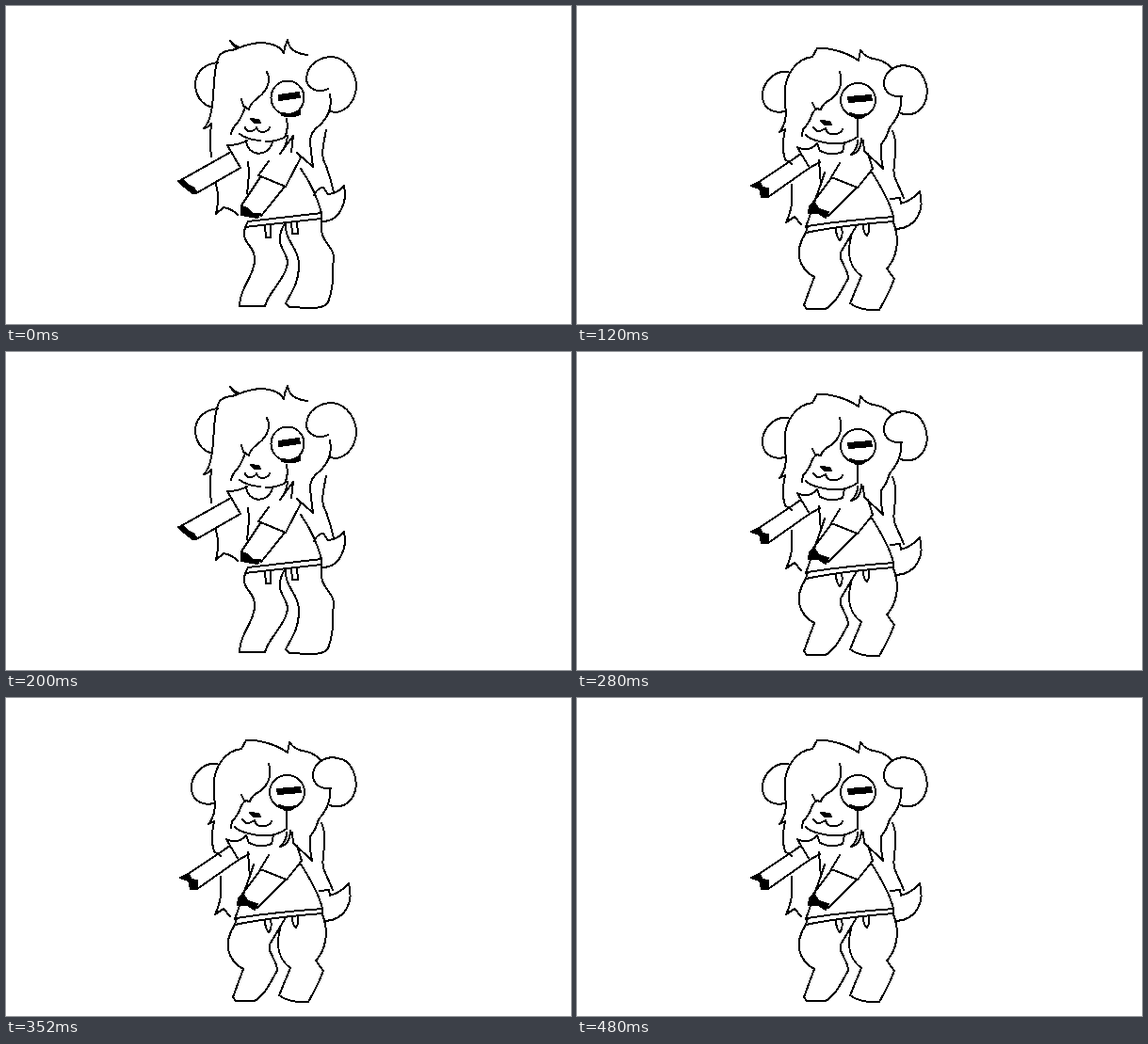
Animation of 600 by 338 pixels, one loop 0.56 s. Source, as an HTML page:

```html
<!DOCTYPE html>
<html lang="en">
<head>
<meta charset="utf-8">
<title>Dancing sheep</title>
<style>
  html, body { margin: 0; width: 100%; height: 100%; overflow: hidden; background: #fff; }
  svg { display: block; width: 100%; height: 100%; shape-rendering: crispEdges; }
  g { fill: none; stroke: #000; stroke-width: 2; stroke-linecap: round; stroke-linejoin: round; }
  .ink { fill: #000; }
  #down { visibility: hidden; }
</style>
</head>
<body>
<svg viewBox="0 0 600 338">
  <g id="up">
    <!-- hair -->
    <path d="M240 47L246 45Q242 43 238 37Q243 43 249 44Q267 36 283 41Q291 43 295 50Q296 42 299 36Q301 50 320 52"/>
    <path d="M241 47Q228 47 225 56C219 75 222 92 218 112Q216 124 210 130Q215 129 218 125Q216 145 218 160"/>
    <path d="M277 70C283 82 275 92 266 99Q259 104 258 110L252 106L250 99M254 108Q250 118 246 124Q240 130 239 136"/>
    <path d="M344 94C347 110 341 118 334 126Q322 134 323 146L326 171L309 156"/>
    <path d="M299 138Q298 149 291 157L305 138L303 155M340 132C336 152 334 160 340 170Q345 184 348 198"/>
    <path d="M223 189Q227 204 223 221L231 214Q239 215 246 222"/>
    <!-- ears -->
    <path d="M225 60C207 62 201 74 201 84C202 97 209 105 217 107"/>
    <path d="M342 88C331 94 319 87 319 77C320 61 334 54 347 54C363 56 372 72 372 86C371 104 357 116 345 112"/>
    <!-- face -->
    <ellipse cx="299" cy="97.500" rx="17.500" ry="18"/>
    <path class="ink" d="M290 95L311 92L312 97L290 100Z"/>
    <path class="ink" d="M292 114L302 115L312 111V115Q303 119 293 116Z"/>
    <path class="ink" d="M260 120L268 121L270 124L264 124Z"/>
    <path d="M254 129Q255 134 260 133Q265 132 266 129Q267 134 273 134Q279 133 280 129"/>
    <path d="M298 120L299 128L297 138M248 136Q256 142 270 143M276 144Q290 144 298 138M255 143C257 161 278 161 283 145"/>
    <!-- arms and shirt -->
    <path d="M256 143Q247 148 235 148L249 172L202 199M239 155L184 186"/>
    <path class="ink" d="M183 186L188 185L193 190L199 193L203 198L198 199L193 195L187 190Z"/>
    <path d="M257 166Q259 180 256 199M279 165L268 180L297 192L313 161L309 156M270 182L250 212M296 192L271 223"/>
    <path class="ink" d="M250 213L256 215L262 221L270 221L267 225L250 222Z"/>
    <path d="M313 173Q328 194 335 220L257 229L254 235L335 226V220"/>
    <path d="M327 201Q331 193 337 193L342 200Q353 199 359 191C363 209 354 229 336 229"/>
    <path d="M275 233L276 246H281V232M303 230L304 242H310L309 229"/>
    <!-- legs -->
    <path d="M254 235C249 255 265 252 264 272C262 289 248 301 248 319H275C278 305 298 289 299 272C298 260 283 253 296 231"/>
    <path d="M297 232C296 250 311 257 311 275C311 295 303 304 297 316L301 320L323 321Q339 321 342 315C349 297 346 286 348 267C347 252 332 253 335 226"/>
  </g>
  <g id="down">
    <!-- hair -->
    <path d="M250 54L255 45C270 44 288 50 299 58L301 47Q307 56 320 57Q329 60 334 66"/>
    <path d="M250 54C233 56 221 73 221 91C220 109 226 120 215 134L221 131Q217 151 221 163L228 168"/>
    <path d="M279 70C283 84 278 92 270 99Q260 104 259 110L253 109L250 103M256 109C246 113 252 120 240 131L239 138"/>
    <path d="M344 97C345 113 338 122 332 129Q329 140 323 147Q322 158 325 173L305 154L304 143"/>
    <path d="M302 141Q302 155 291 158Q298 152 298 143M335 133C343 150 334 168 337 181L347 204"/>
    <path d="M228 190C229 209 228 217 222 230L231 224L238 232"/>
    <!-- ears -->
    <path d="M224 70C207 68 196 84 197 97C198 109 209 115 220 112"/>
    <path d="M345 96C333 97 326 91 326 82C326 69 340 61 352 64C367 65 374 85 371 98C367 114 353 118 344 114"/>
    <!-- face -->
    <ellipse cx="298.500" cy="100" rx="18.500" ry="18"/>
    <path class="ink" d="M288 97L312 95L313 100L289 102Z"/>
    <path class="ink" d="M290 114Q300 118 307 115Q303 121 296 119Z"/>
    <path class="ink" d="M259 122L268 123L270 126L263 126Z"/>
    <path d="M251 129Q255 135 260 132L264 130Q266 138 275 136Q281 135 282 131"/>
    <path d="M298 119V139Q286 148 268 146Q248 143 243 137M255 146L258 154Q270 160 282 155L284 146"/>
    <!-- arms and shirt -->
    <path d="M255 146Q246 156 234 150L238 157L192 188M238 157L247 172L258 166M247 172L203 203"/>
    <path class="ink" d="M185 191L194 187L197 193L203 194L203 203L196 203L194 194Z"/>
    <path d="M257 164L259 190L263 177L243 235M279 167L270 182L298 193L314 173L309 157M270 183L249 211M297 193L267 223"/>
    <path class="ink" d="M247 213L252 209L257 216L267 219L264 225L256 220H246Z"/>
    <path d="M312 175Q332 206 336 224C309 226 276 229 245 234L243 241Q282 233 336 229V224"/>
    <path d="M333 205L343 204L344 210Q357 206 364 197C369 215 362 235 340 237"/>
    <path d="M275 236Q275 245 279 249Q283 245 281 235M304 232Q304 242 308 244Q311 241 310 231"/>
    <!-- legs -->
    <path d="M243 241C229 262 237 280 252 288L241 318L244 322H264C276 315 281 301 288 290C288 278 277 270 280 262L296 235"/>
    <path d="M291 246C286 265 291 279 302 287L290 316Q300 324 321 323Q331 306 337 290L329 279C340 268 343 248 336 230"/>
  </g>
</svg>
<script>
  const up = document.getElementById("up");
  const down = document.getElementById("down");
  const changes = [120, 200, 280, 400, 480];
  const loop = 560;

  function draw(now) {
    const time = now % loop;
    const step = changes.filter(change => time >= change).length;
    up.style.visibility = step % 2 ? "hidden" : "visible";
    down.style.visibility = step % 2 ? "visible" : "hidden";
  }

  const start = performance.now();
  function tick() {
    draw(performance.now() - start);
    requestAnimationFrame(tick);
  }
  tick();
</script>
</body>
</html>
```
